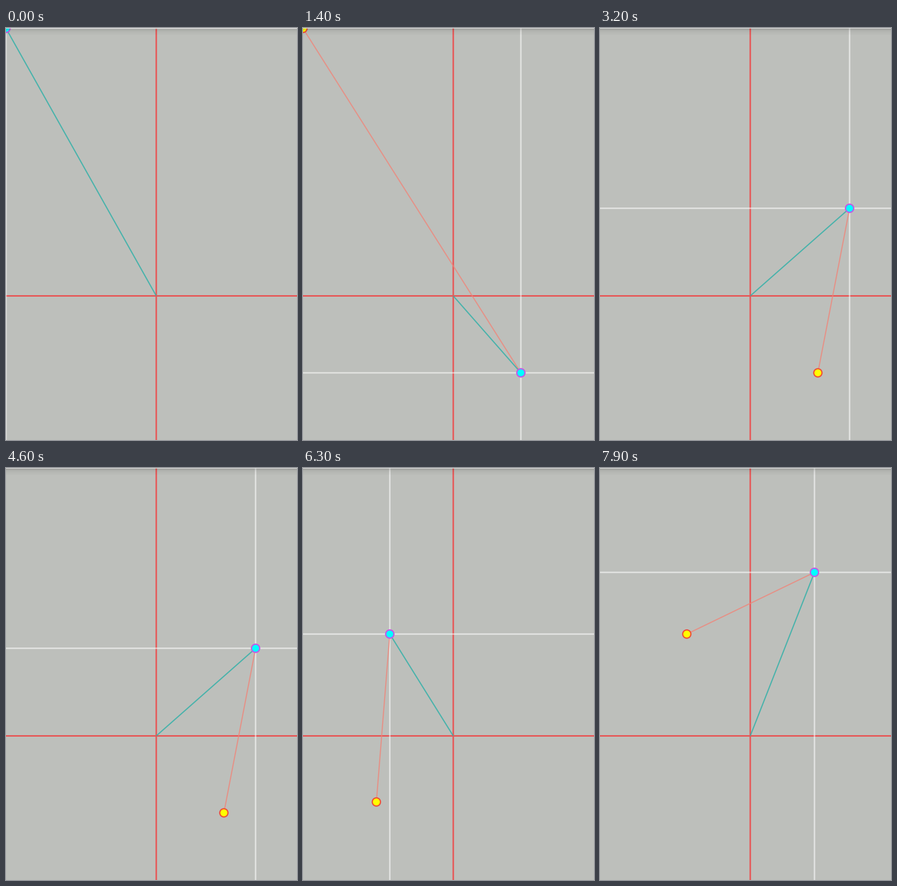
A matplotlib script that plays this animation: 581x822 px, repeating every 8 s.

```python
import numpy as np
import matplotlib.pyplot as plt
from matplotlib.animation import FuncAnimation
from matplotlib.patches import Circle, Rectangle

W, H, DPI = 581, 822, 100
STEP, LOOP = 100, 8000
PX = 72 / DPI
CENTER = (300, 534.5)

# Each tap: time in ms and position
TAPS = [
    (0, (0, 0.8)),
    (1400, (435, 688)),
    (3200, (498.3, 359.7)),
    (4700, (146.5, 666.3)),
    (6000, (173.3, 331.3)),
    (7000, (428.2, 208.2)),
]

plt.rcParams["toolbar"] = "None"
fig = plt.figure(figsize=(W / DPI, H / DPI), dpi=DPI)
ax = fig.add_axes([0, 0, 1, 1])
ax.set_xlim(0, W)
ax.set_ylim(H, 0)
ax.axis("off")
fig.patch.set_facecolor("#bdbfbb")


def line(color, width, z, alpha=1.0, xs=(), ys=()):
    artist, = ax.plot(xs, ys, color=color, lw=width * PX, alpha=alpha,
                      zorder=z, solid_capstyle="butt", snap=False)
    return artist


def ball(fill, edge):
    return ax.add_patch(Circle((0, 0), 8.2, fc=fill, ec=edge,
                               lw=2.5 * PX, zorder=6))


def join(artist, a, b):
    artist.set_data([a[0], b[0]], [a[1], b[1]])


cx, cy = CENTER
line("#e75656", 3, 1, xs=(cx, cx), ys=(0, H))
line("#e75656", 3, 1, xs=(0, W), ys=(cy, cy))

cross_v = line("#ffffff", 3, 2, 0.55)
cross_h = line("#ffffff", 3, 2, 0.55)
trail = line("#f28377", 2.3, 3, 0.75)
spoke = line("#2fb0a8", 2.4, 4, 0.8)
old_ball = ball("#ffff00", "#f05038")
new_ball = ball("#00ffff", "#c455e8")

# Soft shadow below the light top edge
for y in range(1, 14):
    ax.add_patch(Rectangle((0, y), W, 1, fc="black", lw=0, zorder=7,
                           alpha=0.17 * np.exp(-(y - 1) / 4.5)))
ax.add_patch(Rectangle((0, 0), W, 1, fc="#eeefee", lw=0, zorder=8))


def update(frame):
    now = frame * STEP
    k = max(i for i, (t, _) in enumerate(TAPS) if t <= now)
    x, y = pos = TAPS[k][1]
    prev = TAPS[max(k - 1, 0)][1]
    join(cross_v, (x, 0), (x, H))
    join(cross_h, (0, y), (W, y))
    join(spoke, CENTER, pos)
    join(trail, prev, pos)
    old_ball.center = prev
    new_ball.center = pos
    trail.set_visible(k > 0)
    old_ball.set_visible(k > 0)
    return cross_v, cross_h, trail, spoke, old_ball, new_ball


anim = FuncAnimation(fig, update, frames=LOOP // STEP, interval=STEP,
                     repeat=True, repeat_delay=0, blit=False)
plt.show()
```
